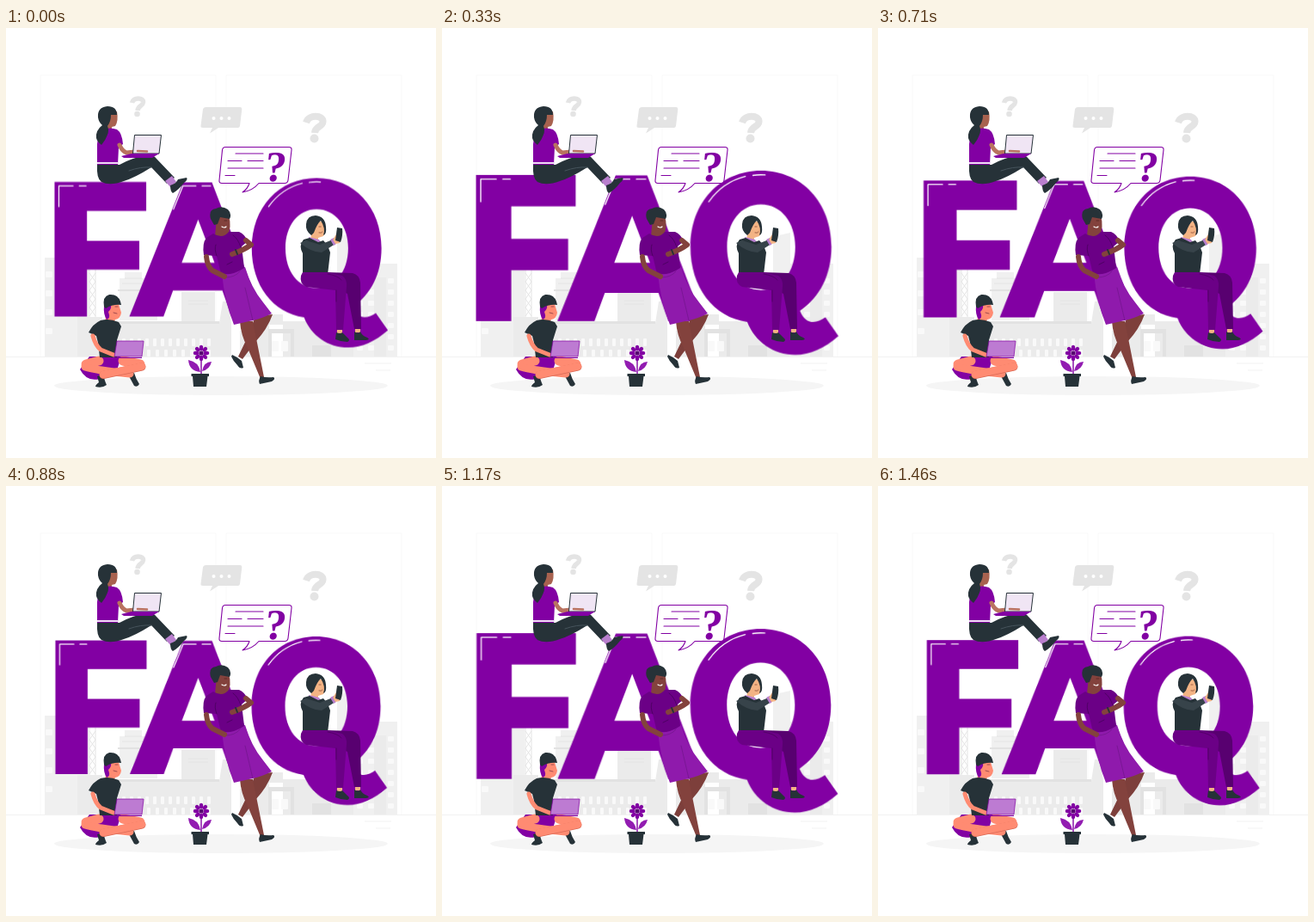
An HTML page that plays this animation: 500 px wide and 500 px high, repeating every 1500 ms.

```html
<!DOCTYPE html>
<html lang="en">
<head>
<meta charset="utf-8">
<title>FAQ</title>
<style>
html, body { margin: 0; width: 100%; height: 100%; overflow: hidden; background: #fff; }
svg { display: block; width: 100vw; height: 100vh; }
#letters { transform-origin: 250px 273px; }
.p { fill: #8200a3; }
.d { fill: #263238; }
.line { fill: none; stroke-linecap: round; stroke-linejoin: round; }
</style>
</head>
<body>
<svg viewBox="0 0 500 500">
  <!-- backdrop -->
  <g fill="none" stroke="#f9f9f9"><path d="M40 382V55H244V382M256 382V55H460V382"/></g>
  <g id="city">
    <path fill="#f0f0f0" d="M45 267H96V382H45ZM132 291H138V284H158V291H162V306H176V340H132ZM404 274H455V382H404ZM385 250L392 241L405 238V300H385Z"/>
    <path fill="#ebebeb" d="M83 336H112V382H83ZM112 343H250V382H112ZM204 307H243V343H204ZM248 343L252 318H258L262 343V382H248ZM272 352H283V333H322V345H306V382H272ZM322 341H372V382H322ZM372 338H404V382H372ZM428 290H442V382H428Z"/>
    <path fill="#e2e2e2" d="M112 341H248V344H112ZM130 304H178V306H130ZM305 350H335V382H331V355H309V382H305ZM356 369H378V382H356Z"/>
    <path fill="none" stroke="#e4e4e4" d="M97 281V336M104 281V336M97 285L104 295L97 305L104 315L97 325L104 335M104 285L97 295L104 305L97 315L104 325L97 335M212 317H235M212 321H235M138 291H158M135 297H160"/>
  </g>
  <path stroke="#ececec" stroke-width=".7" d="M0 382.5H500M417 390H448M430 398H447"/>
  <ellipse cx="250" cy="416" rx="194" ry="11" fill="#f5f5f5"/>

  <g fill="none" stroke="#e4e4e4">
    <path stroke-width="5.5" d="M146.500 87C148 80 160 80.500 159.500 86.500C159 91 153.500 90 153 96"/>
    <path stroke-width="8" d="M349 110C352 100 369 101 368.500 109C368 115.500 359.500 114 359 122"/>
  </g>
  <g fill="#e4e4e4">
    <circle cx="152.500" cy="100" r="3.300"/><circle cx="358.500" cy="128.500" r="5"/>
    <path d="M232 92H272Q274.500 92 274.300 94.500L272 114Q271.700 116 269.500 116H247L237 122.500L240 116H229Q226 116 226.500 113.500L229 94.500Q229.500 92 232 92Z"/>
  </g>
  <g fill="#fff"><circle cx="241.500" cy="105" r="2"/><circle cx="250.500" cy="105" r="2"/><circle cx="259.500" cy="105" r="2"/></g>

  <g id="letters">
    <g class="p">
      <path d="M57.500 179.500H163.500V213H95V247.500H155.500V281H95V335H57.500Z"/>
      <path fill-rule="evenodd" d="M206 180H239.500L299 335H262L251.500 305H194.500L183.500 335H144ZM223.500 223L204.500 273H242.500Z"/>
      <path fill-rule="evenodd" d="M360.500 175C404 175 435.500 209 435.500 256C435.500 286 423 310 402 324C408 339 419 338 429 331L443 351C428 364 413 371 397 371C374 371 354 357 346 336C310 331 285.500 299 285.500 256C285.500 209 317 175 360.500 175ZM360.500 211C339 211 324.500 230 324.500 256C324.500 283 339 302 360.500 302C382 302 397 283 397 256C397 230 382 211 360.500 211Z"/>
    </g>
    <path class="line" stroke="#fff" stroke-width="1.200" d="M62.500 208V184H79M86 184H94M195 211L206 184H221M228 184H238M305 208Q320 187 344 181M352 180Q358 179 365 179.500"/>
  </g>

  <!-- speech bubble -->
  <g class="line" stroke="#8200a3" stroke-width="1.100">
    <path fill="#fff" d="M255 138.500H329Q332.500 138.500 332 142L328 177Q327.500 180.500 324 180.500H294Q287 189 275 191Q281 187 283 180.500H251Q247.500 180.500 248 177L251.500 142Q252 138.500 255 138.500Z"/>
    <path d="M267 146H299M258 154.500H274M281 154.500H299M258 163H299M255 171.500H266"/>
  </g>
  <text class="p" transform="translate(299.500 177.500) skewX(-6)" font-family="'Liberation Serif', serif" font-weight="700" font-size="50">?</text>

  <!-- woman with laptop -->
  <g>
    <path fill="#a8624f" d="M120 98L129 97Q131 108 127 114L123 115V121L115 120V106Z"/>
    <path class="p" d="M113 118Q121 115 129 118Q135 122 136 135L131 139L130 159H106V135Q107 122 113 118Z"/>
    <path class="d" d="M129 101Q129 91 118 91Q106 92 107 104Q108 110 112 113Q104 119 105 128Q106 132 111 136Q116 130 118 124Q120 119 118 114Q122 109 122 101Z"/>
    <path class="d" d="M106 159H132Q146 151 163 148Q171 147 175 152L196 174L187 181L169 162Q150 174 137 178Q121 184 111 179Q105 175 106 159Z"/>
    <path fill="#eedcf3" d="M106 156H131V158H106Z"/>
    <path class="line" stroke="#46545c" d="M143 166Q157 161 169 162"/>
    <path fill="#b97fce" d="M185 178L193 172L198 179L191 185Z"/>
    <path class="d" d="M191 183Q198 181 200 176Q205 175 210 174Q212 176 207 180Q201 188 194 192Q191 190 191 183Z"/>
    <path class="line" stroke="#b97360" stroke-width="5" d="M132 136Q135 143 140 145L160 143"/>
    <path fill="#f0e5f4" stroke="#263238" d="M149.500 124.500H180.500L178 146H147.500Z"/>
    <path class="p" d="M134 149L146 146H178L170 151H137Z"/>
    <path class="line" stroke="#b97360" stroke-width="2.500" d="M153 143L164 143.500"/>
  </g>

  <!-- man in beanie -->
  <g>
    <path class="p" d="M97 382H134L129 398L109 408Q94 412 86 397Z"/>
    <path class="d" d="M106 405L113 403Q115 411 117 415Q112 419 104 417Q104 415 108 412ZM142 403L149 401Q151 408 155 414Q153 418 149 416Z"/>
    <g class="line" stroke="#ff8b72">
      <path stroke-width="11" d="M108 387L93 391M136 387L156 391"/>
      <path stroke-width="9" d="M92 394Q104 398 144 402"/>
      <path stroke="#d86955" stroke-width="9" d="M158 394L113 403.500"/>
      <path stroke-width="8.500" d="M158 393.500L113 403"/>
    </g>
    <path fill="#ff8b72" d="M118 323L131 321L134 331Q133 338 127 339L125 343L115 342Z"/>
    <path class="p" d="M114 323L122 321Q123 327 119 330Q122 338 117 339Q113 333 114 323Z"/>
    <path class="d" d="M114 324Q112 312 120 310Q130 309 133 318L134 322Q124 321 116 326Z"/>
    <path class="d" d="M110 340Q120 337 131 342L134 347L129 363V383H109L107 366L105 358L96 354Q101 344 110 340Z"/>
    <path class="line" stroke="#ff8b72" stroke-width="5" d="M101 358Q104 369 110 374L125 380"/>
    <path fill="#bd7bd2" stroke="#8200a3" stroke-width=".7" d="M129 364H160L158 382H126Z"/>
    <path class="p" d="M111 383H158V384H113Z"/>
    <path class="line" stroke="#863c46" stroke-width=".8" d="M125 331L129 332M127 324L130 324"/>
  </g>

  <!-- potted flower -->
  <g>
    <path class="line" stroke="#8200a3" stroke-width="1.400" d="M227 382V403"/>
    <path fill="#921cb1" d="M226 400Q213 399 212 386Q224 388 226 400ZM228 399Q230 388 239 388Q237 397 228 399Z"/>
    <g id="petals" class="p"></g>
    <circle cx="227" cy="378" r="2.600" fill="#560070"/>
    <path class="d" d="M215.500 402H236V405H234.500L233 417H218L217 405H215.500Z"/>
  </g>

  <!-- leaning man -->
  <g>
    <path fill="#7d3f3b" d="M290 335L310 333Q304 350 290 365L275 385L270 382L282 357Z"/>
    <path class="d" d="M263 380Q268 382 274 387L276 395Q272 397 269 392Q264 387 262 382Z"/>
    <path fill="#83423d" d="M272 341H287Q290 356 293 371L300 406L296 408L281 372Q273 357 272 341Z"/>
    <path class="d" d="M296 405Q303 407 311 406Q314 408 309 411L295 414Q293 410 296 405Z"/>
    <path fill="#8f1aac" d="M251 285L278 278Q285 302 299 319L309 332Q297 338 287 340L265 345Q254 318 251 285Z"/>
    <path class="line" stroke="#74168e" stroke-width=".8" d="M278 302L287 340M256 290Q266 290 272 283"/>
    <path fill="#83423d" d="M245 220L259 218Q263 233 257 241L254 244L243 242Z"/>
    <path class="d" d="M238 222Q235 211 244 210Q251 206 258 211Q263 216 260 222L249 220L246 228L242 229Z"/>
    <path fill="#6b0086" d="M241 239Q252 246 259 237L271 237Q278 240 281 248L274 254L277 279Q264 288 250 286L245 265L230 264Q228 250 233 244Z"/>
    <path class="line" stroke="#4e0064" d="M245 265Q242 257 244 252M264 241Q270 245 273 255M257 275L263 272"/>
    <path class="line" stroke="#83423d" stroke-width="6" d="M233 266Q234 277 240 282L254 289M279 247L285 252Q277 258 263 263"/>
    <path class="line" stroke="#54241f" stroke-width=".8" d="M254 224H257"/>
    <path class="line" stroke="#fff" stroke-width="1.200" d="M251 231Q254 233 256 231"/>
    <path class="line" stroke="#263238" stroke-width="2" d="M267 258L269 263"/>
  </g>

  <!-- woman with phone -->
  <g>
    <path fill="#f3b384" d="M357 225L370 225Q373 237 369 242L363 244L363 249L354 247Z"/>
    <path class="d" d="M349 228Q350 218 360 218Q371 219 372 231Q373 240 369 241Q372 233 366 224Q362 227 358 238L355 241Q348 236 349 228Z"/>
    <path fill="#b97fce" d="M352 243L364 246L367 251L353 250Z"/>
    <path class="d" d="M346 246L353 244L363 249L369 247L374 253L377 261L374 287H345V262Q340 253 346 246Z"/>
    <path fill="#37434a" d="M342 250L349 247L365 252L380 246L383 251L367 261Q355 261 342 250Z"/>
    <path fill="#b97fce" d="M377 246L381 244L384 251L381 253Z"/>
    <path fill="#f3b384" d="M380 246L384 240L389 245L388 250L383 251Z"/>
    <path class="d" d="M385 232L391 233Q392 241 389 249L383 247Z"/>
    <path fill="#580070" d="M373 284L403 285Q411 287 412 296L413 350H405L397 309L375 298Z"/>
    <path fill="#6b0086" d="M345 284H374L391 288Q397 292 396 301L392 351H384L383 305Q365 303 349 301Q341 297 343 288Z"/>
    <path class="line" stroke="#480059" stroke-width=".7" d="M374 286Q386 288 390 293M384 318V305"/>
    <path fill="#f3b384" d="M385 351H391V355H385ZM406 350H412V354H406Z"/>
    <path class="d" d="M384 354Q389 356 391 354L397 360Q401 363 397 365Q390 365 383 362ZM405 353Q410 356 412 353Q414 358 420 360Q424 362 419 363H405Z"/>
    <path class="line" stroke="#8b4b35" stroke-width=".8" d="M364 231H366M364 238Q367 239 368 237"/>
  </g>
</svg>
<script>
const NS = 'http://www.w3.org/2000/svg';
const add = (id, tag, attrs) => {
  const el = document.createElementNS(NS, tag);
  for (const k in attrs) el.setAttribute(k, attrs[k]);
  document.getElementById(id).append(el);
};

// rows of windows: x, y, columns, rows, step x, step y, width, height
const windows = [
  [46, 283, 1, 4, 10, 22, 8, 7],
  [408, 291, 2, 7, 13, 13, 7, 6],
  [444, 291, 1, 7, 13, 13, 7, 6],
  [126, 361, 13, 1, 9, 9, 4, 9],
  [164, 374, 8, 1, 10, 9, 4, 8],
  [309, 364, 2, 1, 11, 10, 8, 12]
];
for (const [x, y, cols, rows, dx, dy, width, height] of windows)
  for (let i = 0; i < cols * rows; i++)
    add('city', 'rect', {
      x: x + i % cols * dx, y: y + Math.floor(i / cols) * dy,
      width, height, rx: 1, fill: '#f9f9f9'
    });

for (let i = 0; i < 8; i++)
  add('petals', 'ellipse', {
    cx: 227, cy: 372, rx: 2.2, ry: 3.2, transform: `rotate(${i * 45} 227 378)`
  });

const LOOP = 1500;
const beat = [[0, 1], [295, 1.1], [838, 1], [880, 1], [1138, 1.1], [1474, 1], [LOOP, 1]];
document.getElementById('letters').animate(
  beat.map(([t, s]) => ({ offset: t / LOOP, transform: `scale(${s})` })),
  { duration: LOOP, iterations: Infinity }
);
</script>
</body>
</html>
```
